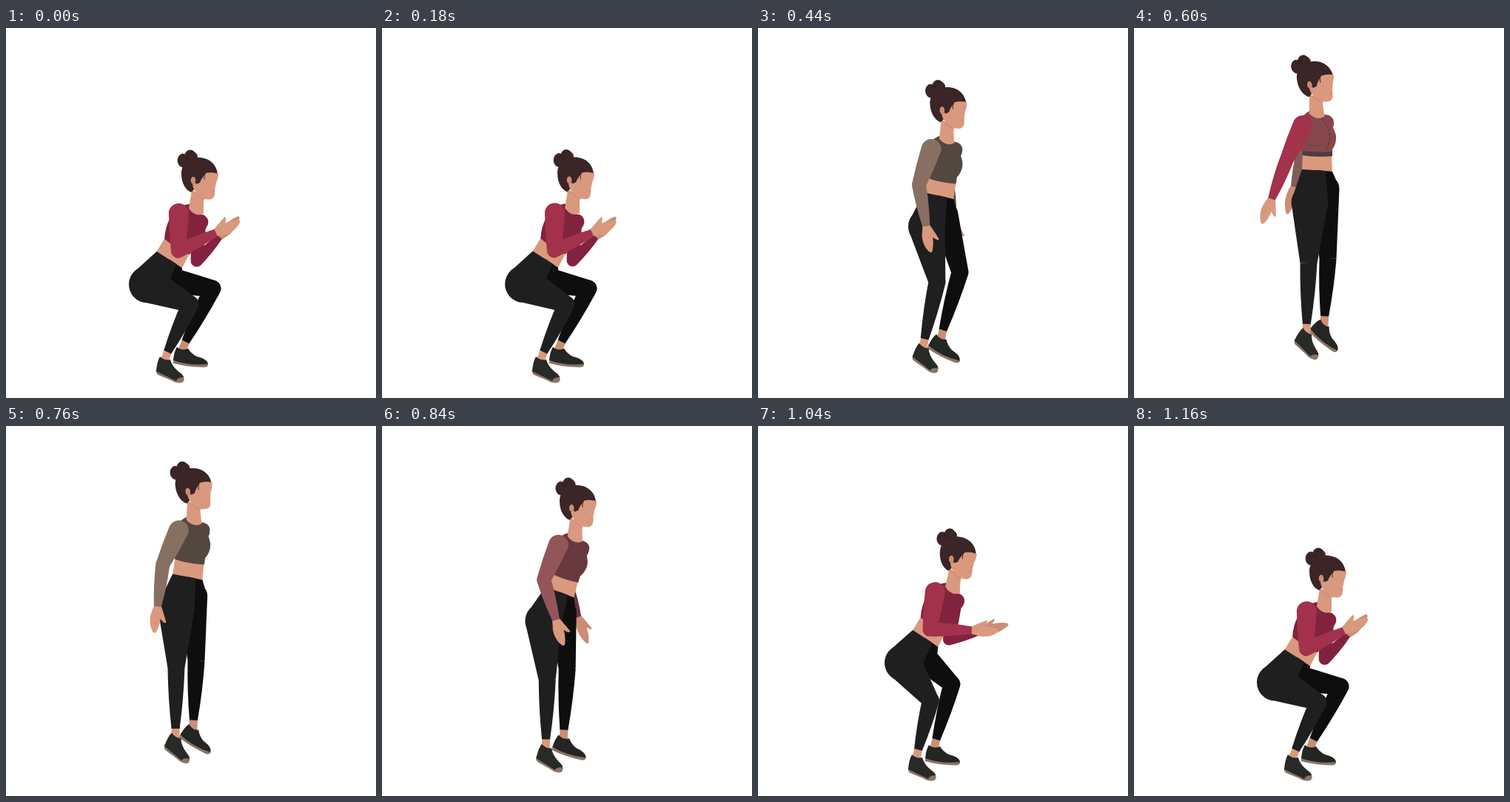
These frames come from a looping animation (500 px wide and 500 px high, 1500 ms). An HTML page:

```html
<!DOCTYPE html>
<html lang="en">
<head>
<meta charset="utf-8">
<title>Squat jump</title>
<style>
  html, body { margin: 0; width: 100%; height: 100%; overflow: hidden; background: #fff; }
  svg { display: block; width: 100%; height: 100%; }
</style>
</head>
<body>
<svg viewBox="0 0 500 500">
  <g id="farHand" fill="#cb8d74"><path d="M-1,-4C6,-7 12,-9 20,-12Q24,-12 17,-6Q28,-6 37,-2Q40,1 34,3Q24,8 12,7Q4,6 -1,4Z"/></g>
  <path id="farSleeve"/>
  <path id="farAnkle" stroke="#cb8d74" stroke-width="11"/>
  <g id="farShoe">
    <path fill="#8a7467" d="M-12,14Q10,20 35,20Q36,25 30,25.500Q5,25 -12,20Z"/>
    <path fill="#242624" d="M-7,-2Q0,4 8,0Q12,7 20,11Q34,14 35,21Q10,24 -12,16Q-11,4 -7,-2Z"/>
  </g>
  <g id="waist"><path fill="#d9997e" d="M-19,50L-20,76L21,79L20,50Z"/></g>
  <path id="farLeg" fill="#0e0e0e"/>
  <path id="nearAnkle" stroke="#d9997e" stroke-width="11"/>
  <g id="nearShoe">
    <path fill="#8a7467" d="M-11,14L18,26L26,24Q28,30 24,32Q17,34 9,29L-8,22Q-12,20 -11,14Z"/>
    <path fill="#282a28" d="M-6,-3Q1,3 8,1Q10,10 20,18Q26,22 26,25Q18,25 16,30L8,26L-11,17Q-10,4 -6,-3Z"/>
  </g>
  <path id="nearLeg" fill="#1f1f1f"/>
  <g id="shirt">
    <path id="cloth" d="M-10,-5Q0,7 11,0Q19,0 22,6Q24,11 22,18Q27,27 26,34Q25,42 21,47L21,56Q0,58 -19,54Q-26,40 -26,26Q-28,6 -10,-5Z"/>
    <g id="trim" fill="none" stroke="#493e3f">
      <path stroke-width="6" d="M-19,52Q0,55 21,53"/>
      <path stroke-dasharray="5 2" d="M7,5Q18,20 18,32L14,47M-10,41Q-5,43 1,42"/>
    </g>
  </g>
  <g id="head">
    <path fill="#d9997e" d="M-6,-28L-10,-3Q-1,9 10,4L10,-20Z"/>
    <g fill="#3b2526" stroke="#2d191b" stroke-width=".7">
      <ellipse cx="-18" cy="-68" rx="7" ry="9"/>
      <ellipse cx="-8" cy="-75" rx="7" ry="7"/>
      <ellipse cx="-5" cy="-73" rx="6.500" ry="6.500"/>
    </g>
    <path fill="#3b2526" d="M29,-49C28,-63 17,-72 3,-72C-11,-72 -20,-63 -20,-50C-20,-37 -14,-28 -7,-25L5,-36Z"/>
    <path fill="#d9997e" d="M13,-51Q21,-53 30,-50Q30,-45 27,-38L25,-28Q26,-17 20,-15.500Q13,-14 6,-19Q-4,-26 -5,-36L5,-40Z"/>
    <path fill="#3b2526" d="M15,-53Q8,-47 5,-38L0,-36L-3,-48Z"/>
    <ellipse cx="-4" cy="-41" rx="3.300" ry="5" fill="#cb8d74"/>
    <path fill="none" stroke="#3b2526" d="M13,-52Q10,-47 11,-42"/>
    <path fill="none" stroke="#c17f68" stroke-width=".8" d="M-4,-27Q4,-17 12,-15M21,-26L25,-27"/>
  </g>
  <g id="nearHand" fill="#d9997e"><path d="M-1,-5C6,-8 12,-11 20,-14Q23,-12 16,-6Q26,-6 35,-2Q38,1 32,4Q24,9 12,8Q4,6 -1,5Z"/></g>
  <path id="nearSleeve"/>
</svg>
<script>
const LOOP = 1500, STEP = 20, ANKLE = 10;

const red = { cloth: [130, 35, 62], sleeve: [162, 50, 75], farCloth: [130, 34, 64], trim: [0] };
const brown = { cloth: [84, 71, 64], sleeve: [135, 111, 97], farCloth: [84, 71, 64], trim: [0] };
const mixed = { cloth: [134, 71, 76], sleeve: [163, 50, 75], farCloth: [130, 92, 88], trim: [1] };

// Arms are the angles of upper arm and forearm; foot is x, y and pitch.
const squat = {
  ...red, neck: [257, 247], lean: [29], nod: [0], nearArm: [91, -26], farArm: [94, -46],
  nearKnee: [249, 373], farKnee: [279, 352], foot: [214, 447, 0]
};
const rise = {
  ...squat, neck: [261, 214], lean: [26], nearArm: [101, 20], farArm: [102, 15],
  nearKnee: [247, 371], farKnee: [278, 353]
};
const takeoff = {
  ...brown, neck: [255, 152], lean: [8.5], nod: [-3], nearArm: [109, 80], farArm: [97, 82],
  nearKnee: [242, 343], farKnee: [273, 330], foot: [223, 430, 20]
};
const flight = {
  ...mixed, neck: [247, 117], lean: [0], nod: [-8], nearArm: [115, 111], farArm: [126, 104],
  nearKnee: [236, 318], farKnee: [262, 312], foot: [233, 410, 33]
};
const fall = {
  ...brown, neck: [254, 129], lean: [7], nod: [-6], nearArm: [115, 97], farArm: [112, 98],
  nearKnee: [230, 327], farKnee: [257, 318], foot: [229, 419, 24]
};
const landing = {
  ...squat, neck: [267, 186], lean: [27], nod: [5], nearArm: [107, 38], farArm: [107, 29],
  nearKnee: [219, 363], farKnee: [246, 342]
};
const times = [170, 280, 440, 600, 760, 940, 1160];
const poses = [squat, rise, takeoff, flight, fall, landing, squat];

// Joints and waistline in the torso's own frame, measured from the neck.
const near = {
  name: 'near', shoulder: [-19, 14.5], upper: 51, fore: 57, armRadii: [13.5, 9.5, 5],
  waist: [[-20, 74], [12, 76]], hip: [-9.5, 119], legRadii: [25, 11.5, 5.5]
};
const far = {
  name: 'far', shoulder: [11, 11], upper: 53, fore: 45, armRadii: [9, 8, 4],
  waist: [[0, 75], [21, 77]], hip: [12.5, 100], legRadii: [18, 11.5, 5.5]
};

const $ = id => document.getElementById(id);

// Slope through a key; parts at rest on either side stay at rest.
function slope(value, i) {
  if (i === 0 || i === times.length - 1) return 0;
  const a = value(i - 1), b = value(i), c = value(i + 1);
  return a === b || b === c ? 0 : (c - a) / (times[i + 1] - times[i - 1]);
}

function poseAt(time) {
  const t = Math.min(Math.max(time, times[0]), times[times.length - 1]);
  let i = 0;
  while (i < times.length - 2 && t >= times[i + 1]) i++;
  const span = times[i + 1] - times[i], s = (t - times[i]) / span;
  const ease = s * s * (3 - 2 * s);
  const pose = {};
  for (const key in squat) {
    pose[key] = squat[key].map((_, n) => {
      const value = k => poses[k][key][n];
      return value(i) + (value(i + 1) - value(i)) * ease
        + span * s * (1 - s) * ((1 - s) * slope(value, i) - s * slope(value, i + 1));
    });
  }
  return pose;
}

function polar([x, y], length, degrees) {
  const a = degrees * Math.PI / 180;
  return [x + length * Math.cos(a), y + length * Math.sin(a)];
}

function onTorso(pose, [x, y]) {
  return polar(polar(pose.neck, x, pose.lean[0]), y, pose.lean[0] + 90);
}

function angleTo([ax, ay], [bx, by]) {
  return Math.atan2(by - ay, bx - ax) * 180 / Math.PI;
}

function middle([ax, ay], [bx, by]) {
  return [(ax + bx) / 2, (ay + by) / 2];
}

// Tapered limb: round at the start, cut straight at the end.
function limb(a, b, ra, rb, bulge) {
  const side = angleTo(a, b) + 90, mid = middle(a, b), rm = (ra + rb) / 2 + bulge;
  const at = (p, r) => polar(p, r, side);
  return `M${at(a, ra)}A${ra},${ra} 0 0 1 ${at(a, -ra)}A${ra},${ra} 0 0 1 ${at(a, ra)}Z`
    + `M${at(a, -ra)}Q${at(mid, -rm)} ${at(b, -rb)}L${at(b, rb)}Q${at(mid, rm)} ${at(a, ra)}Z`;
}

function place(id, [x, y], angle) {
  $(id).setAttribute('transform', `translate(${x} ${y}) rotate(${angle})`);
}

function paint(id, rgb) {
  $(id).setAttribute('fill', `rgb(${rgb.map(v => Math.round(v))})`);
}

function drawLeg(side, pose, foot, pitch) {
  const [hipR, kneeR, ankleR] = side.legRadii;
  const [back, front] = side.waist.map(p => onTorso(pose, p));
  const hip = onTorso(pose, side.hip), knee = pose[side.name + 'Knee'];
  const ankle = polar(foot, ANKLE, angleTo(foot, knee));
  const across = angleTo(middle(back, front), hip) - 90;
  const pelvis = `M${back}L${front}L${polar(hip, hipR, across)}L${polar(hip, -hipR, across)}Z`;
  $(side.name + 'Leg').setAttribute('d',
    pelvis + limb(hip, knee, hipR, kneeR, 0) + limb(knee, ankle, kneeR, ankleR, 2));
  $(side.name + 'Ankle').setAttribute('d', `M${polar(ankle, -2, angleTo(ankle, foot))}L${polar(foot, 3, 90)}`);
  place(side.name + 'Shoe', foot, pitch);
}

function drawArm(side, pose) {
  const [upperAngle, foreAngle] = pose[side.name + 'Arm'];
  const [shoulderR, elbowR, wristR] = side.armRadii;
  const shoulder = onTorso(pose, side.shoulder);
  const elbow = polar(shoulder, side.upper, upperAngle);
  const wrist = polar(elbow, side.fore, foreAngle);
  $(side.name + 'Sleeve').setAttribute('d',
    limb(shoulder, elbow, shoulderR, elbowR, 1) + limb(elbow, wrist, elbowR, wristR, 2));
  place(side.name + 'Hand', wrist, foreAngle);
}

function render(time) {
  const pose = poseAt(time);
  const [x, y, pitch] = pose.foot;
  for (const id of ['waist', 'shirt']) place(id, pose.neck, pose.lean[0]);
  place('head', pose.neck, pose.nod[0]);
  drawLeg(far, pose, [x + 24, y - 14 + pitch * 0.1], pitch);
  drawLeg(near, pose, [x, y], pitch * 0.6);
  drawArm(far, pose);
  drawArm(near, pose);
  paint('cloth', pose.cloth);
  paint('nearSleeve', pose.sleeve);
  paint('farSleeve', pose.farCloth);
  $('trim').setAttribute('opacity', Math.min(Math.max(pose.trim[0], 0), 1));
}

const start = performance.now();
function tick() {
  const time = (performance.now() - start) % LOOP;
  render(time - time % STEP);
  requestAnimationFrame(tick);
}
tick();
</script>
</body>
</html>
```
